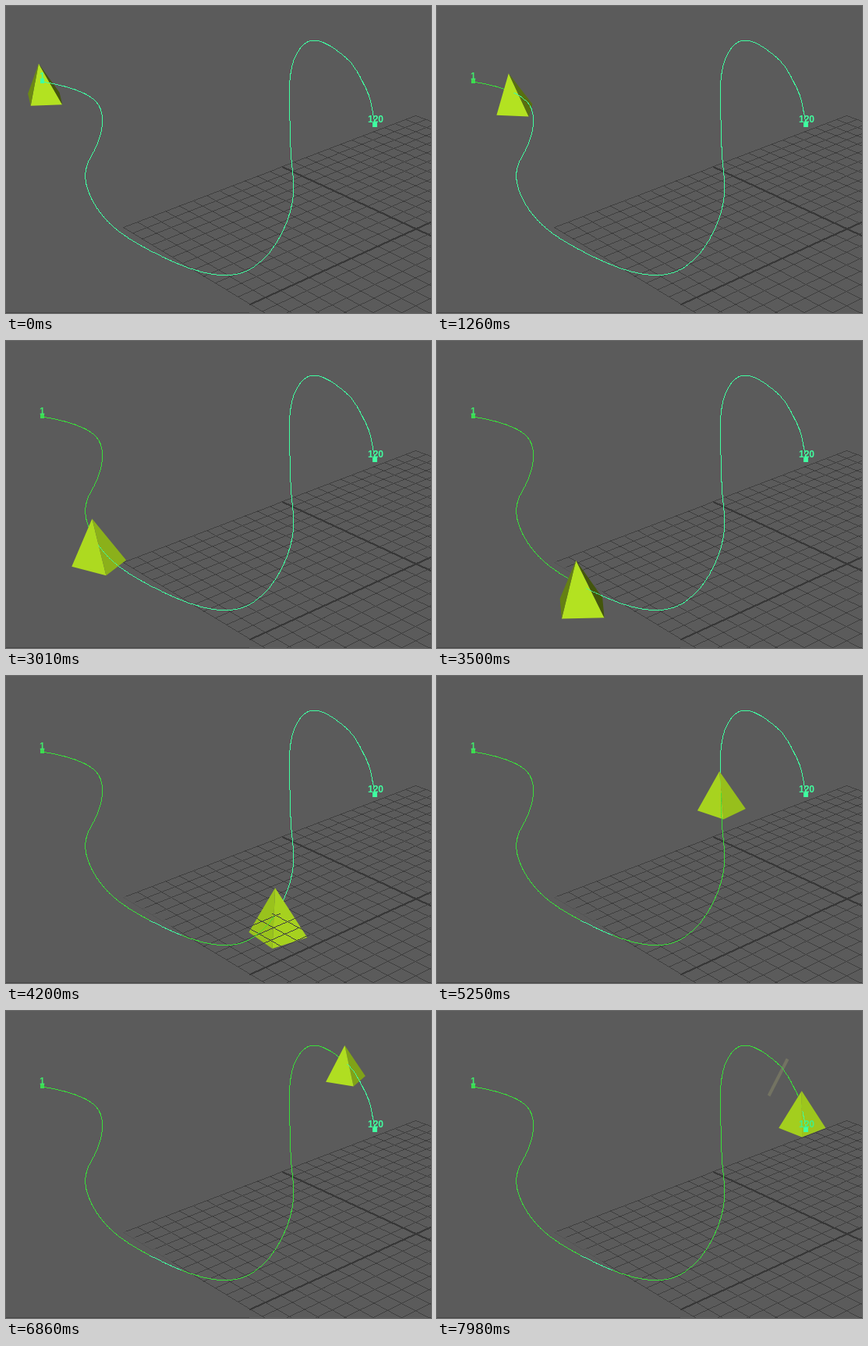
Recreate the animation shown at these times as an HTML page with a canvas. Size 545 px wide and 393 px high, loop 8 s.

```html
<!DOCTYPE html>
<html lang="en">
<head>
<meta charset="utf-8">
<title>Pyramid on a motion path</title>
<style>
  html, body { margin: 0; width: 100%; height: 100%; overflow: hidden; background: #5b5b5b; }
  canvas { position: absolute; left: 0; top: 0; display: block; }
  span { position: absolute; font: bold 12px/12px "Liberation Sans", Arial, sans-serif; color: #40ffa0; }
  #first { left: 43px; top: 84px; }
  #last { left: 464px; top: 139px; }
</style>
</head>
<body>
<canvas id="view" width="545" height="393"></canvas>
<span id="first">1</span><span id="last">120</span>
<script>
const W = 545, H = 393, LOOP = 8000, STEP = 70, START = 210, END = 8500;
const BG = '#5b5b5b', AHEAD = '#40ffa0', TRAIL = '#3ade3a';
const HOLDS = [6, 22, 37, 53, 69, 84, 99]; // steps that repeat the pose before

const view = document.getElementById('view').getContext('2d');
const first = document.getElementById('first');
const last = document.getElementById('last');

// Key points, evenly spaced in time from START to END
const route = spline([
  [46, 96.5], [60.8, 99.2], [82, 104.6], [107, 115.5], [122.3, 137.5], [116.5, 176.5],
  [101.2, 216.5], [124, 268.7], [188, 314.5], [298.5, 342], [362.3, 268], [366.2, 204],
  [363.7, 154], [363, 109.5], [368.6, 69], [394.6, 43.5], [433.7, 64.4], [450.3, 84.7],
  [463, 109.5], [469, 131], [472.5, 150]
]);
const yaw = spline([40, 42, 85, 91, 41, 7, -4, -16, -22, -4, 3].map(v => [v]));

// Smooth cubic through evenly timed points; slopes are found by relaxation
function spline(pts) {
  const n = pts.length - 1, at = i => pts[Math.min(Math.max(i, 0), n)];
  const m = pts.map((p, i) => p.map((_, c) => (at(i + 1)[c] - at(i - 1)[c]) / 2));
  for (let pass = 0; pass < 20; pass++) {
    for (let i = 0; i <= n; i++) {
      m[i] = m[i].map((_, c) => {
        const rise = 3 * (at(i + 1)[c] - at(i - 1)[c]);
        if (i === 0) return (rise - m[1][c]) / 2;
        if (i === n) return (rise - m[n - 1][c]) / 2;
        return (rise - m[i - 1][c] - m[i + 1][c]) / 4;
      });
    }
  }
  return t => {
    const u = Math.min(Math.max((t - START) / (END - START), 0), 1) * n;
    const i = Math.min(Math.floor(u), n - 1), s = u - i, r = 1 - s;
    return pts[i].map((a, c) => a * r * r * (1 + 2 * s) + pts[i + 1][c] * s * s * (3 - 2 * s)
      + m[i][c] * s * r * r - m[i + 1][c] * s * s * r);
  };
}

// Crisp line, one square per pixel along the longer axis
function line(ctx, a, b, color, size = 1) {
  const dx = b[0] - a[0], dy = b[1] - a[1];
  const n = Math.max(1, Math.ceil(Math.max(Math.abs(dx), Math.abs(dy))));
  ctx.fillStyle = color;
  for (let i = 0; i <= n; i++) {
    ctx.fillRect(Math.round(a[0] + dx * i / n), Math.round(a[1] + dy * i / n), size, size);
  }
}

function curve(from, to, color) {
  from = Math.max(from, START);
  to = Math.min(to, END);
  for (let t = from; t < to; t += 20) {
    line(view, route(t), route(Math.min(t + 20, to)), color);
  }
}

function trail(from, to) {
  curve(from, to, TRAIL);
  curve(Math.max(from, 3510), Math.min(to, 3665), AHEAD);
}

function ground(u, v) {
  const w = 1 + .19 * u - .236 * v;
  return [(150 + 474.8 * u + 250.6 * v) / w, (283 - 116.5 * u + 106.2 * v) / w];
}

function makeGrid() {
  const canvas = document.createElement('canvas');
  canvas.width = W;
  canvas.height = H;
  const ctx = canvas.getContext('2d');
  for (let i = 0; i <= 24; i++) {
    const k = i / 24, style = i === 12 ? ['#383838', 2] : ['#3f3f3f', 1];
    line(ctx, ground(k, 0), ground(k, 1), ...style);
    line(ctx, ground(0, k), ground(1, k), ...style);
  }
  return canvas;
}
const grid = makeGrid();

function stroke(a, b, color, width) {
  view.beginPath();
  view.moveTo(...a);
  view.lineTo(...b);
  view.strokeStyle = color;
  view.lineWidth = width;
  view.stroke();
}

// Marks the pyramid leaves behind
function marks(t) {
  if (t >= 3360) stroke([147, 283], [212, 321], 'rgba(91,91,91,.75)', 8);
  if (t >= 7420) stroke([449.5, 61.5], [425.5, 108.5], '#737362', 4);
}

function pyramid(t) {
  const [x, y] = route(t), [turn] = yaw(t);
  const half = 24.3 + .046 * y, high = 1.58 * half;
  const lean = (500 - x) * .0002 * high;
  const apex = [x - lean, y - high / 2], cx = x + lean, cy = y + high / 2;
  const flat = half * (.335 + .0004 * cy);
  const rad = Math.PI / 180;
  const corner = deg => [cx + half * Math.cos(deg * rad), cy + flat * Math.sin(deg * rad)];
  const shape = new Path2D();
  for (let k = 0; k < 4; k++) {
    const deg = turn + 90 * k, a = corner(deg), b = corner(deg + 90);
    const side = (a[0] - apex[0]) * (b[1] - apex[1]) - (a[1] - apex[1]) * (b[0] - apex[0]);
    if (side <= 0) continue;
    const face = new Path2D();
    [apex, a, b].forEach(p => face.lineTo(...p));
    face.closePath();
    const facing = Math.max(0, Math.cos((deg + 45 - 94) * rad));
    const lit = .38 + .62 * facing ** .55;
    view.fillStyle = `rgb(${180 * lit | 0},${227 * lit | 0},${34 * lit | 0})`;
    view.fill(face);
    shape.addPath(face);
  }

  view.save();
  view.clip(shape);
  // The floor cuts through the lower half here
  if (t > 3750 && t < 4450) {
    const top = Math.round(y + 3);
    view.drawImage(grid, 0, top, W, H - top, 0, top, W, H - top);
  }
  view.globalAlpha = .7;
  if (t < 3700 || t > 6200) curve(t + 40, t + 900, AHEAD);
  else trail(t - 700, t - 30);
  view.restore();
}

function draw(t) {
  view.fillStyle = BG;
  view.fillRect(0, 0, W, H);
  view.drawImage(grid, 0, 0);
  marks(t);
  view.fillStyle = '#484848';
  view.fillRect(0, 392, 312, 1);
  trail(START, t);
  curve(t, END, AHEAD);
  pyramid(t);

  const begun = t > 1000;
  first.style.color = begun ? '#40e86c' : AHEAD;
  last.style.color = t > 7700 ? '#40f08c' : AHEAD;
  view.fillStyle = begun ? '#3cdc50' : AHEAD;
  view.fillRect(44, 94, 5, 5);
  view.fillStyle = AHEAD;
  view.fillRect(470, 149, 6, 6);
}

function tick() {
  const n = Math.floor(performance.now() % LOOP / STEP);
  draw((HOLDS.includes(n) ? n - 1 : n) * STEP);
  requestAnimationFrame(tick);
}
tick();
</script>
</body>
</html>
```
